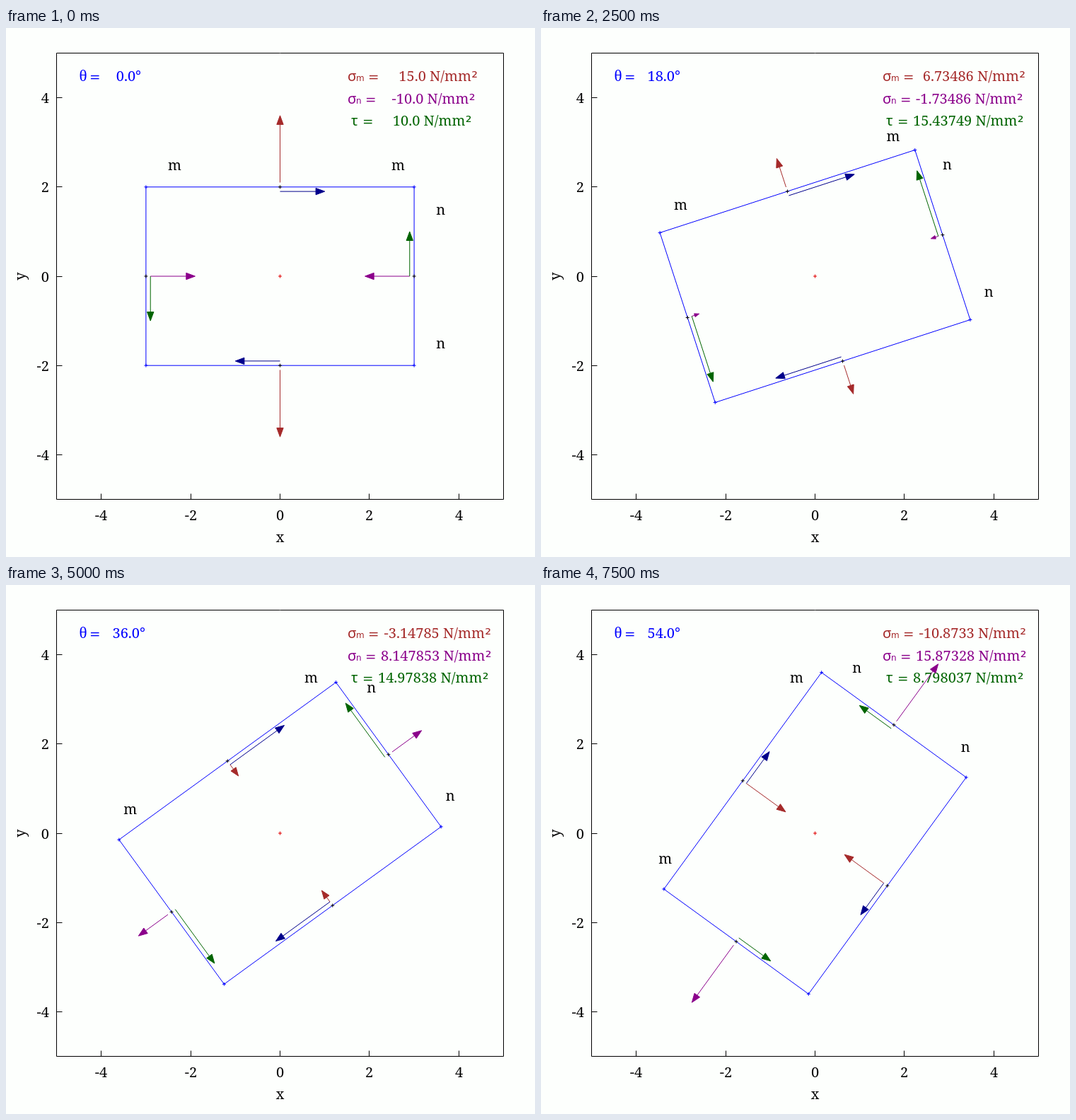
Animation of 748 by 748 pixels, one loop 8 s. Source, as an HTML page with a canvas:

```html
<!DOCTYPE html>
<html lang="en">
<head>
<meta charset="utf-8">
<title>Plane stress transformation</title>
<style>
html, body { margin: 0; width: 100%; height: 100%; overflow: hidden; background: #fdfffd; }
canvas { display: block; }
</style>
</head>
<body>
<canvas id="plot" width="748" height="748"></canvas>
<script>
const ctx = document.getElementById('plot').getContext('2d');
const SERIF = '20px "Noto Serif", serif';
const SANS = '20px "Noto Sans", sans-serif';
const BROWN = '#a52a2a', PURPLE = '#8b008b', GREEN = '#006400', NAVY = '#00008b', BLUE = '#0000ff';
const STEP_MS = 500, STEPS = 16, STEP_DEG = 3.6;
ctx.lineJoin = 'round';

const snap = v => Math.floor(v) + 0.5;
const toPx = (x, y) => [387.5 + 63.2 * x, 351 - 63.1 * y];
const toPixel = (x, y) => toPx(x, y).map(snap);

function text(str, x, y, color = '#000', font = SERIF, align = 'left') {
  ctx.font = font;
  ctx.fillStyle = color;
  ctx.textAlign = align;
  ctx.fillText(str, x, y);
}

function path(points, color, closed) {
  ctx.strokeStyle = color;
  ctx.beginPath();
  points.forEach(p => ctx.lineTo(...p));
  if (closed) ctx.closePath();
  ctx.stroke();
}

function plus([x, y], color) {
  path([[x - 2.5, y], [x + 2.5, y]], color);
  path([[x, y - 2.5], [x, y + 2.5]], color);
}

function arrow(from, to, color) {
  const dx = to[0] - from[0], dy = to[1] - from[1];
  const len = Math.hypot(dx, dy);
  if (!len) return;
  const head = Math.min(12.6, len * 0.6), ux = dx / len, uy = dy / len, half = head * 0.37;
  const bx = to[0] - ux * head, by = to[1] - uy * head;
  path([from, [bx, by]], color);
  path([to, [bx - uy * half, by + ux * half], [bx + uy * half, by - ux * half]], color, true);
  ctx.fillStyle = color;
  ctx.fill();
}

// Eight characters at most, no leading zero, at least one decimal
function format(v) {
  const sign = v < 0 ? '-' : '', whole = Math.trunc(Math.abs(v)) || '';
  const decimals = 7 - (sign + whole).length;
  return v.toFixed(decimals).replace(/^(-?)0\./, '$1.').replace(/(\.\d+?)0+$/, '$1').padStart(8);
}

function equals(x, y, color) {
  text('=', x, y, color, '18.5px "DejaVu Sans", sans-serif');
}

function stressRow(symbol, sub, symbolX, equalsX, valueX, y, value, color) {
  text(symbol, symbolX, y, color, SANS);
  text(sub, symbolX + 12, y, color, '12px "DejaVu Sans", sans-serif');
  equals(equalsX, y, color);
  const label = format(value) + ' N/mm';
  text(label, valueX, y, color);
  text('²', valueX + ctx.measureText(label).width + 0.5, y + 2, color, '22px "DejaVu Sans", sans-serif');
}

function drawAxes() {
  path([toPixel(-5, -5), toPixel(5, -5), toPixel(5, 5), toPixel(-5, 5)], '#000', true);
  for (let v = -4; v <= 4; v += 2) {
    const [x, bottom] = toPixel(v, -5), [left, y] = toPixel(-5, v);
    path([[x, bottom], [x, bottom - 8]], '#000');
    path([[left, y], [left + 8, y]], '#000');
    text(v, x, 696, '#000', SERIF, 'center');
    text(v, 61, y + 7, '#000', SERIF, 'right');
  }
  text('x', 387.5, 727, '#000', SERIF, 'center');
  ctx.save();
  ctx.translate(27, 351);
  ctx.rotate(-Math.PI / 2);
  text('y', 0, 0, '#000', SERIF, 'center');
  ctx.restore();
}

function draw(deg) {
  const a = deg * Math.PI / 180, c = Math.cos(a), s = Math.sin(a);
  const c2 = Math.cos(2 * a), s2 = Math.sin(2 * a);
  const sigmaM = 2.5 + 12.5 * c2 - 10 * s2;
  const sigmaN = 5 - sigmaM;
  const tau = 10 * c2 + 12.5 * s2;
  const turn = (x, y) => toPx(x * c - y * s, x * s + y * c);

  ctx.fillStyle = '#fdfffd';
  ctx.fillRect(0, 0, 748, 748);
  drawAxes();

  text('θ', 103.5, 75, BLUE, '23px "Liberation Serif", serif');
  equals(118, 75, BLUE);
  text(deg.toFixed(1).padStart(4) + '°', 150.5, 75, BLUE);
  stressRow('σ', 'm', 483, 512, 534.5, 75, sigmaM, BROWN);
  stressRow('σ', 'n', 483, 508, 530, 106.5, sigmaN, PURPLE);
  stressRow('τ', '', 488, 504, 526, 138, tau, GREEN);

  const corners = [[-3, -2], [3, -2], [3, 2], [-3, 2]].map(p => turn(...p));
  path(corners, BLUE, true);
  corners.forEach(p => plus(p, BLUE));
  plus(toPx(0, 0), '#e00000');

  // Opposite faces mirror each other through the centre
  for (const k of [1, -1]) {
    const force = (x1, y1, x2, y2, color) =>
      arrow(turn(k * x1, k * y1), turn(k * x2, k * y2), color);
    const m = 2 + 0.1 * Math.sign(sigmaM), n = 3 + 0.1 * Math.sign(sigmaN);
    force(0, m, 0, m + sigmaM / 10, BROWN);
    force(n, 0, n + sigmaN / 10, 0, PURPLE);
    force(2.9, 0, 2.9, tau / 10, GREEN);
    force(0, 1.9, tau / 10, 1.9, NAVY);
    plus(turn(3 * k, 0), '#000');
    plus(turn(0, 2 * k), '#000');
  }

  for (const [str, x, y] of [['m', -2.5, 2.5], ['m', 2.5, 2.5], ['n', 3.5, 1.5], ['n', 3.5, -1.5]]) {
    const [px, py] = turn(x, y);
    text(str, px - 0.5, py + 7.7);
  }
}

const start = performance.now();
function tick() {
  const step = Math.floor((performance.now() - start) / STEP_MS) % STEPS;
  draw(step * STEP_DEG);
  requestAnimationFrame(tick);
}
tick();
</script>
</body>
</html>
```
